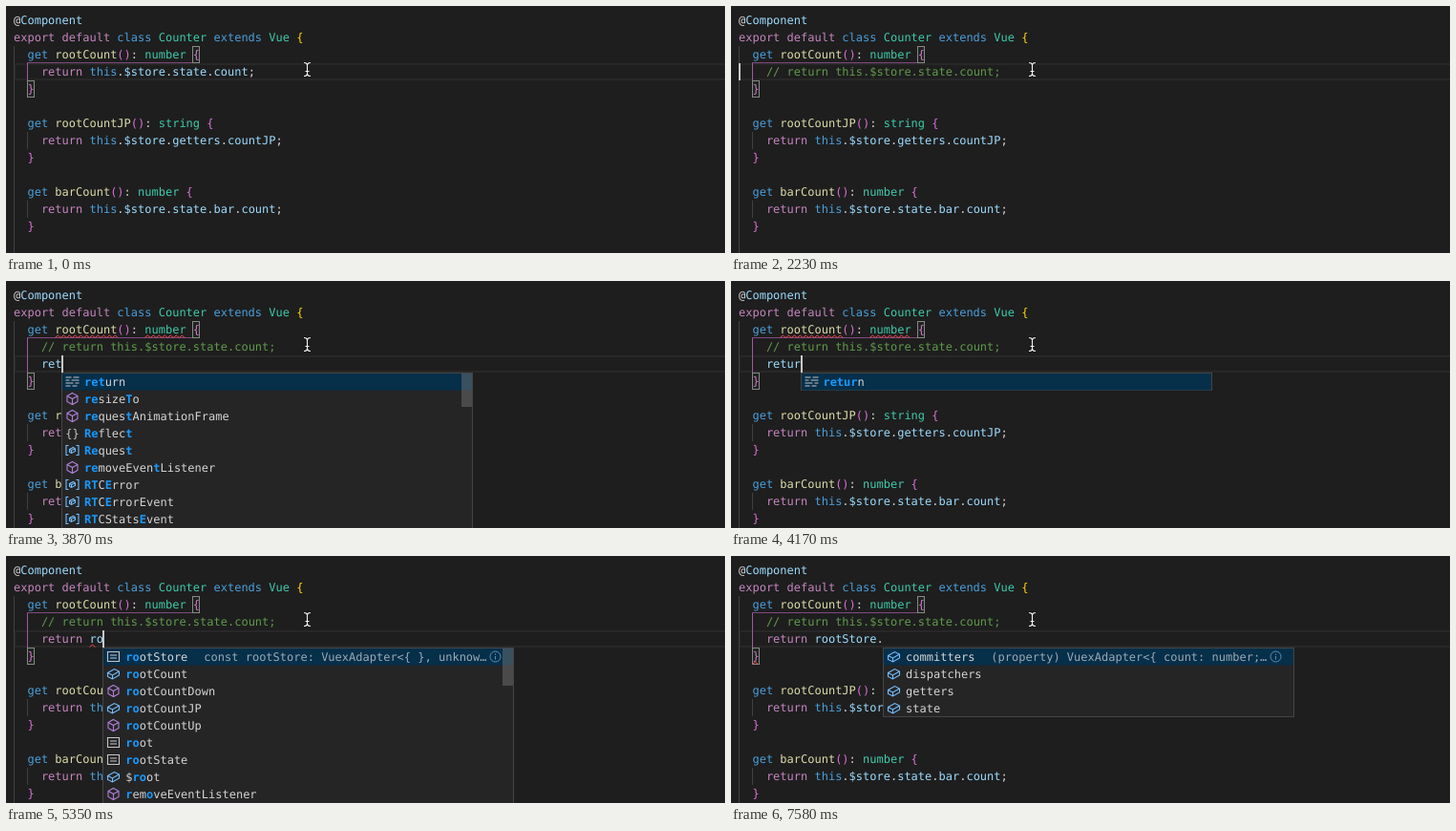
An HTML page for the animation above (8 s loop, 753 by 259 pixels).

```html
<!DOCTYPE html>
<html lang="en">
<head>
<meta charset="utf-8">
<title>Code editor</title>
<style>
  html, body { margin: 0; width: 100%; height: 100%; overflow: hidden; background: #1e1e1e; }
  svg { display: block; width: 753px; height: 259px; }
  text {
    font: 12px "DejaVu Sans Mono", "Noto Sans Mono", monospace;
    white-space: pre;
    text-rendering: geometricPrecision;
  }
</style>
</head>
<body>
<svg id="stage" viewBox="0 0 753 259"></svg>
<script>
const LOOP = 8000, LEFT = 8, TOP = 6, ROW = 18, CHAR = 7.2246;
const C = {
  fg: "#d4d4d4", flow: "#c586c0", word: "#4a9fdb", type: "#3fcaab", call: "#dcdcaa",
  name: "#9cdcfe", note: "#609a4c", gold: "#ffd700", pink: "#da70d6",
  guide: "#404040", error: "#f14c4c", field: "#75beff", method: "#b180d7", match: "#189bff"
};

const head = ["@Component", "export default class Counter extends Vue {", "  get rootCount(): number {"];
const tail = [
  "  }", "",
  "  get rootCountJP(): string {", "    return this.$store.getters.countJP;", "  }", "",
  "  get barCount(): number {", "    return this.$store.state.bar.count;", "  }"
];
const code = "    return this.$store.state.count;";
const note = "    // return this.$store.state.count;";

const lists = {
  ret: [
    ["key", "return"], ["method", "resizeTo"], ["method", "requestAnimationFrame"],
    ["module", "Reflect"], ["variable", "Request"], ["method", "removeEventListener"],
    ["variable", "RTCError", "rte"], ["variable", "RTCErrorEvent", "rte"], ["variable", "RTCStatsEvent", "rte"]
  ],
  root: [
    ["constant", "rootStore"], ["field", "rootCount"], ["method", "rootCountDown"],
    ["field", "rootCountJP"], ["method", "rootCountUp"], ["constant", "root"],
    ["constant", "rootState"], ["field", "$root"], ["method", "removeEventListener"]
  ],
  members: [["field", "committers"], ["field", "dispatchers"], ["field", "getters"], ["field", "state"]]
};
const details = {
  root: "const rootStore: VuexAdapter<{ }, unknow…",
  members: "(property) VuexAdapter<{ count: number;…"
};

// Squiggles are [row, first column, last column].
const missing = [[2, 6, 15], [2, 19, 25]];
const unknown = [[4, 11, 12]];
const popup = (list, query = "", count = lists[list].length) => ({ list, query, count });
const typed = (text, menu = null) => ({ body: [note, "    " + text], cursor: [4, 4 + text.length], on: true, menu });

// Each step changes part of the editor's state.
const steps = [
  [0, { body: [code], cursor: [3, 35], on: false, scope: "getter", boxes: true,
        select: 0, bulb: false, errors: [], menu: null }],
  [450, { cursor: [3, 0], on: true }],
  [600, { cursor: [4, 0], select: 36, boxes: false }],
  [900, { bulb: true }],
  [1040, { on: false }],
  [1340, { body: [note], select: 39, on: true }],
  [1630, { cursor: [5, 0], select: 0, bulb: false, scope: "class", boxes: true }],
  [1930, { cursor: [4, 0], scope: "getter" }],
  [2230, { cursor: [3, 0] }],
  [2380, { cursor: [3, 38] }],
  [2530, { errors: missing }],
  [2680, { ...typed(""), boxes: false }],
  [2830, { boxes: true }],
  [3280, { on: false }],
  [3730, typed("re")],
  [3870, typed("ret", popup("ret", "ret"))],
  [4020, typed("retu", popup("ret", "retu", 1))],
  [4170, typed("retur", popup("ret", "retur", 1))],
  [4470, typed("return")],
  [4620, typed("return ")],
  [4760, typed("return r")],
  [4910, { menu: popup("root", "r") }],
  [5200, { errors: unknown }],
  [5350, typed("return ro", popup("root", "ro"))],
  [5500, typed("return roo", popup("root", "roo", 8))],
  [5950, typed("return rootStore")],
  [6100, { errors: [[4, 11, 20]] }],
  [6540, { errors: [[4, 4, 20]], on: false }],
  [7140, typed("return rootStore.", popup("members"))],
  [7430, { errors: [[5, 2, 3]] }],
  [7580, { on: false }]
];

const colX = col => LEFT + col * CHAR;
const rowY = row => TOP + row * ROW;
const esc = s => s.replace(/&/g, "&amp;").replace(/</g, "&lt;");
const rect = (x, y, w, h, fill, more = "") =>
  `<rect x="${x}" y="${y}" width="${w}" height="${h}" fill="${fill}" ${more}/>`;
const path = (d, stroke, width = 1) =>
  `<path d="${d}" fill="none" stroke="${stroke}" stroke-width="${width}"/>`;
const span = (x, fill, s, more = "") => `<tspan x="${x}" fill="${fill}" ${more}>${esc(s)}</tspan>`;
const text = (y, inner) => `<text y="${y}">${inner}</text>`;

function colour(token, row, rest) {
  if (token.startsWith("//")) return C.note;
  if (/^(export|default|return)$/.test(token)) return C.flow;
  if (/^(class|extends|get|this)$/.test(token)) return C.word;
  if (/^(number|string|Counter|Vue)$/.test(token)) return C.type;
  if (/^[{}()]$/.test(token)) return row === 1 ? C.gold : C.pink;
  if (/^[\w$]/.test(token)) return rest.startsWith("(") ? C.call : C.name;
  return C.fg;
}

function codeLine(line, row) {
  let out = "";
  for (const m of line.matchAll(/\/\/.*|[\w$]+|[^\s\w$]/g)) {
    out += span(colX(m.index), colour(m[0], row, line.slice(m.index + m[0].length)), m[0]);
  }
  return text(rowY(row) + 13, out);
}

function squiggle([row, from, to]) {
  const x0 = colX(from), x1 = colX(to), y = rowY(row) + 17.5;
  let d = `M${x0} ${y}`;
  for (let i = 1; x0 + i * 3 <= x1 + 1; i++) d += `L${x0 + i * 3} ${y - (i % 2) * 2.5}`;
  return path(d, C.error);
}

function guides(s, lines) {
  const mid = 3 + s.body.length;
  const inClass = s.scope === "class";
  let out = path("M8.5 42V259", inClass ? "#a89216" : C.guide);
  lines.forEach((line, row) => {
    if (line.startsWith("    ") && row >= mid) out += path(`M22.5 ${rowY(row)}v18`, C.guide);
  });
  out += path(`M22.5 60V${rowY(mid)}`, inClass ? C.guide : "#a457a1");
  out += inClass ? path("M8 41.5H304", "#a89216") : path("M22 59.5H196", "#80497e");
  return out;
}

function bracketBox(row, col) {
  return rect(Math.floor(colX(col)) + .5, rowY(row) + .5, 7, 17, "#1d251d", 'stroke="#888"');
}

const bulb = `<circle cx="20.5" cy="66" r="4.8" fill="#ffcc00"/>` +
  rect(18, 69, 5, 3, "#ffcc00") + rect(18, 72, 5, 2, "#d8d8d8");

function icon(kind, x, y) {
  const draw = {
    key: () => path("M-7-4.5h6M1-4.5h6M-7-1.5h4M-1-1.5h8M-7 1.5h8M3 1.5h4M-7 4.5h5M0 4.5h5", "#c5c5c5"),
    method: () => path("M0-6L5.5-3V3L0 6L-5.5 3V-3ZM-5.5-3L0 0L5.5-3M0 0V6", C.method, 1.1),
    field: () => path("M-6-1L1-5L6-2.5V1.5L-1 5.5L-6 3ZM-6-1L-1 1.5L6-2.5M-1 1.5V5.5", C.field, 1.1),
    constant: () => path("M-6-5H6V5H-6ZM-3.5-1.5h7M-3.5 1.5h7", "#c5c5c5", 1.1),
    variable: () => path("M-4-5H-6.5V5H-4M4-5H6.5V5H4M-3-1L1-3L3-1.5V1L-1 3L-3 2ZM-3-1L-1 0L3-1.5M-1 0V3", C.field, 1.1),
    module: () => text(4, span(-7.2, "#c5c5c5", "{}"))
  };
  return `<g transform="translate(${x} ${y})">${draw[kind]()}</g>`;
}

function label(name, query, x) {
  let hit = 0, out = "";
  [...name].forEach((ch, i) => {
    const on = hit < query.length && ch.toLowerCase() === query[hit];
    if (on) hit++;
    out += span(x + i * CHAR, on ? C.match : C.fg, ch, on ? 'font-weight="bold"' : "");
  });
  return out;
}

function menuBox(menu, cursorX) {
  const x = Math.floor(cursorX), y = rowY(5), w = 430;
  const items = lists[menu.list].slice(0, menu.count);
  const long = items.length > 8;
  const h = long ? 218 : items.length * ROW;
  let out = rect(x + .5, y + .5, w, h - 1 + (long ? 0 : 1), "#252526", 'stroke="#454545"');
  out += rect(x + 1, y + 1, w - 1, 17.5, "#062f4a");
  items.forEach(([kind, name, alt], i) => {
    const mid = y + 9.5 + i * ROW, tx = cursorX + 23.4;
    out += icon(kind, x + 11.5, mid) + text(mid + 4.5, label(name, alt || menu.query, tx));
    if (i === 0 && details[menu.list]) {
      out += text(mid + 4.5, span(tx + name.length * CHAR + 17, "#9ba9b5", details[menu.list]));
      out += `<circle cx="${x + 411.5}" cy="${mid}" r="5.5" fill="none" stroke="#5c91b5"/>` +
        path(`M${x + 411.5} ${mid - 3}v1.3m0 1.2v3.5`, "#5c91b5", 1.1);
    }
  });
  if (long) out += rect(x + 419, y + 1, 11, menu.list === "ret" ? 35 : 39, "#797979", 'opacity=".45"');
  return out;
}

const beam = "M312 59.5Q315 59.5 315.5 61.5Q316 59.5 319 59.5M315.5 61V72M312 73.5Q315 73.5 315.5 71.5Q316 73.5 319 73.5M313.5 68.5h4";
const mouse = path(beam, "#111", 3) + path(beam, "#f4f4f4", 1.2);

function picture(s) {
  const lines = [...head, ...s.body, ...tail];
  const [row, col] = s.cursor;
  let out = rect(0, 0, 753, 259, "#1e1e1e");
  if (s.select) out += rect(8, 60, s.select * CHAR, 18, "#1d4e7b", 'rx="3"');
  else out += rect(9, rowY(row) + 1, 760, 16, "none", 'stroke="#282828" stroke-width="2"');
  out += guides(s, lines);
  if (s.boxes) {
    out += s.scope === "class" ? bracketBox(1, 41) : bracketBox(2, 26) + bracketBox(3 + s.body.length, 2);
  }
  out += lines.map(codeLine).join("") + s.errors.map(squiggle).join("");
  if (s.bulb) out += bulb;
  if (s.menu) out += menuBox(s.menu, colX(col));
  if (s.on) out += rect(Math.floor(colX(col)), rowY(row), 2, 18, "#c8c8c6");
  return out + mouse;
}

const stage = document.getElementById("stage");
let shown = -1;

function update(now) {
  const t = now % LOOP;
  const count = steps.filter(([start]) => start <= t).length;
  if (count !== shown) {
    shown = count;
    stage.innerHTML = picture(Object.assign({}, ...steps.slice(0, count).map(step => step[1])));
  }
}

const origin = performance.now();
function tick() {
  update(performance.now() - origin);
  requestAnimationFrame(tick);
}
tick();
</script>
</body>
</html>
```
